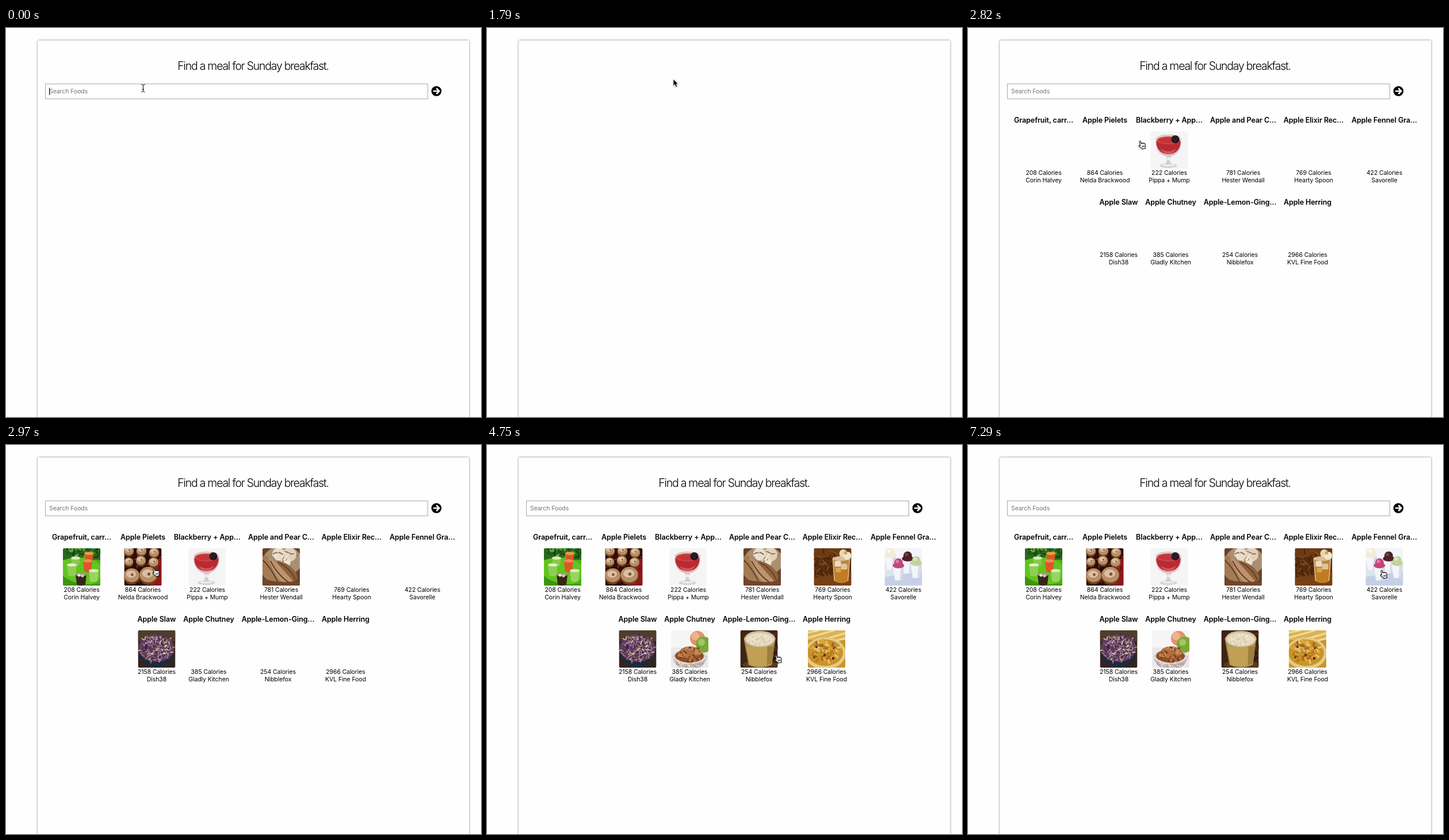
Write an HTML page that moves like this. It is 826x678 px and loops after 8000 ms.

```html
<!DOCTYPE html>
<html lang="en">
<head>
<meta charset="utf-8">
<title>Meal search</title>
<style>
  html, body { margin: 0; width: 100%; height: 100%; overflow: hidden; background: #fefefe; }
  svg { display: block; font-family: Inter, "Open Sans", sans-serif; }
  .sheet { fill: #fefefe; filter: drop-shadow(0 .6px 1.5px rgba(0, 0, 0, .56)); }
  .head { font-size: 19.5px; font-weight: 300; letter-spacing: -1.24px; }
  .small { font-size: 10.5px; letter-spacing: -.08px; }
  .name { font-size: 12.5px; font-weight: 600; letter-spacing: -.08px; }
  .mid { text-anchor: middle; }
</style>
</head>
<body>
<svg id="stage" width="826" height="678" viewBox="0 0 826 678">
  <defs><clipPath id="frame"><rect width="65" height="65" rx="2.5"/></clipPath></defs>
  <rect class="sheet" x="55" y="21.5" width="750.5" height="700" rx="2"/>
  <g id="form">
    <text class="head mid" x="429.5" y="73">Find a meal for Sunday breakfast.</text>
    <rect x="68.5" y="97.5" width="665" height="26" fill="#fff" stroke="#a9a9a9"/>
    <text id="field" class="small" x="75" y="114.3"></text>
    <path id="caret" d="M0 104V117" stroke="#000"/>
    <circle cx="748.5" cy="110" r="8.8"/>
    <path d="M743 110H753M748.4 105L753.4 110 748.4 115" fill="none" stroke="#fff" stroke-width="2.5"/>
  </g>
  <g id="results"></g>
  <g id="ibeam" fill="none" stroke="#000">
    <path d="M-3-6.5Q0-6.5 0-4.5Q0-6.5 3-6.5M0-4.5V4.5M-3 6.5Q0 6.5 0 4.5Q0 6.5 3 6.5M-1.5 2H1.5"/>
  </g>
  <g id="arrow">
    <path d="M0 0V12L2.7 9.4 4.6 14 6.8 13 4.9 8.7H8.6Z" stroke="#fff" stroke-width=".8"
      style="filter:drop-shadow(0 1px 1px rgba(0,0,0,.35))"/>
  </g>
  <g id="hand">
    <g transform="rotate(-14 6 8)" stroke="#000" stroke-linejoin="round">
      <path d="M3.4 8.6V1.8a1.2 1.2 0 0 1 2.4 0V5.6a1.1 1.1 0 0 1 2.2.3 1.1 1.1 0 0 1 2.1.5 1.1 1.1 0 0 1 2 .7V10.8L11 13.4V15.2H4.9V13.8L1.2 9.6C.2 8.2 1.8 7.2 2.6 8Z" fill="#fff"/>
      <path d="M6.2 9.5V12.6M8 9.5V12.6M9.8 9.5V12.6" stroke-width=".8"/>
    </g>
  </g>
</svg>
<script>
const $ = id => document.getElementById(id);
const LOOP = 8000, STEP = 148.7, LEAD = 10;

// shape helpers for the 65 x 65 food pictures
const box = (x, y, w, h, fill, r = 0) => `<rect x="${x}" y="${y}" width="${w}" height="${h}" rx="${r}" fill="${fill}"/>`;
const oval = (x, y, rx, ry, fill) => `<ellipse cx="${x}" cy="${y}" rx="${rx}" ry="${ry}" fill="${fill}"/>`;
const dot = (x, y, r, fill) => oval(x, y, r, r, fill);
const shape = (d, fill) => `<path d="${d}" fill="${fill}"/>`;
const line = (d, color, w = 1) => `<path d="${d}" fill="none" stroke="${color}" stroke-width="${w}"/>`;
const ground = fill => box(0, 0, 65, 65, fill);

function seeded(seed) {
  return () => (seed = seed * 16807 % 2147483647) / 2147483647;
}

// scatters short strips of the given colours inside an ellipse
function strips(seed, n, cx, cy, rx, ry, colors, len, w) {
  const rnd = seeded(seed);
  let out = '';
  for (let i = 0; i < n; i++) {
    const a = rnd() * 6.283, d = Math.sqrt(rnd()), b = rnd() * 6.283;
    const x = cx + rx * d * Math.cos(a), y = cy + ry * d * Math.sin(a);
    out += line(`M${x.toFixed(1)} ${y.toFixed(1)}l${(len * Math.cos(b)).toFixed(1)} ${(len * Math.sin(b)).toFixed(1)}`,
      colors[i % colors.length], w);
  }
  return out;
}

const glass = (x, y, w, h, fill, top) =>
  shape(`M${x} ${y}H${x + w}L${x + w - 2} ${y + h}Q${x + w / 2} ${y + h + 4} ${x + 2} ${y + h}Z`, fill) +
  oval(x + w / 2, y, w / 2, 2.8, top);
const muffin = (x, y, r) => dot(x, y + 2, r, '#6d3f1f') + oval(x, y, r * .95, r * .85, '#b98d66') +
  oval(x - 1, y - 2, r * .6, r * .45, '#d9c0a3') + dot(x + 1, y - 1, r * .17, '#7c5236');
const cup = (x, y, scoop, light) => shape(`M${x - 10} ${y + 4}H${x + 10}L${x + 6} ${y + 29}H${x - 6}Z`, '#f3f5fa') +
  shape(`M${x + 4} ${y + 6}H${x + 10}L${x + 6} ${y + 29}H${x + 2}Z`, '#d5dbea') +
  oval(x, y + 3, 10, 5, scoop) + dot(x, y - 2, 7.5, scoop) + dot(x - 2, y - 4, 3, light);

const pictures = {
  juice: () => ground('#4fae17') + box(0, 0, 65, 20, '#2b6a1b') + strips(5, 60, 38, 7, 33, 12, ['#123f10', '#1e5a16', '#7fb355'], 6, 2.2) +
    oval(27, 41, 43, 25, '#62c41f') + shape('M0 48Q20 66 65 62V65H0Z', '#3f9312') +
    glass(37, 9, 16, 14, '#d8581f', '#ee9a4a') + glass(14, 17, 16, 13, '#8dc653', '#dcefbd') +
    glass(35, 22, 16, 18, '#e05528', '#f08a56') + glass(7, 29, 17, 18, '#8fce55', '#e0f2cb') +
    glass(45, 39, 17, 18, '#98d462', '#dcedc0') + glass(22, 46, 19, 17, '#38241a', '#a8978a') +
    dot(28, 47, 2.5, '#ece6e0') + dot(34, 48, 2.5, '#d6cbc2'),
  pies: () => ground('#2b0d0a') + box(46, 18, 19, 47, '#8e171b') + strips(8, 45, 32, 32, 34, 34, ['#1a0705', '#9c1d20', '#4d1210'], 6, 2) +
    muffin(8, 4, 9) + muffin(30, 4, 9) + muffin(52, 7, 9) + muffin(8, 23, 8) + muffin(29, 21, 9) +
    muffin(51, 24, 9) + muffin(13, 47, 14) + muffin(42, 46, 16),
  cocktail: () => ground('#f6f4f4') + oval(31, 60, 15, 4, '#d6d2d4') + oval(31, 59, 11, 2, '#efedee') +
    shape('M27 43H36L33 50 36 58H26L29 50Z', '#d3cdd0') + dot(31.5, 48, 2.5, '#f2eff0') +
    shape('M9 13H53C55 34 43 44 31 44C19 44 7 34 9 13Z', '#dcc3c6') + shape('M10 17H52C53 31 43 40 31 40C19 40 9 31 10 17Z', '#b92a33') +
    shape('M17 30Q31 40 45 30Q40 40 31 40T17 30Z', '#d4565a') + oval(31, 14, 21.5, 8, '#e5c9c8') +
    oval(31, 16, 20, 7, '#cf4340') + oval(30, 16, 16, 4.5, '#c2333a') + line('M9.5 13A22 8 0 0 1 53 13', '#cfc3c6') +
    dot(43, 14, 7, '#25171f') + strips(3, 14, 43, 14, 5, 5, ['#574052', '#0d080d'], 1.5, 1.5),
  pears: () => ground('#674329') + oval(35, 22, 34, 26, '#a98f72') + dot(28, 10, 11, '#e6dccb') + dot(47, 11, 12, '#e0d2bd') + dot(40, 24, 9, '#ebe0cd') +
    line('M18 10Q28 4 35 11M42 6Q50 12 55 9', '#8f6b4e', 2) + strips(31, 18, 38, 13, 22, 12, ['#f5eee0', '#9a7757'], 5, 1.5) +
    shape('M0 14Q10 9 18 25Q32 44 34 62Q11 62 0 46Z', '#a57b54') +
    shape('M10 16Q23 22 42 44Q59 56 48 64Q25 63 10 16Z', '#bd9470') + shape('M23 23Q42 21 58 42Q65 55 54 58Q40 42 23 23Z', '#8f623c') +
    line('M1 21Q16 35 28 62M14 22Q27 48 48 61M28 25Q49 35 57 55', '#5e3b22', 1.8) + shape('M0 52Q22 62 65 57V65H0Z', '#70452a'),
  elixir: () => ground('#542a10') + box(0, 0, 65, 16, '#6b3a14') + strips(4, 40, 18, 28, 30, 30, ['#7a4316', '#3e1d0b', '#8d5120'], 9, 1.6) +
    shape('M0 51L65 42V65H0Z', '#784012') + shape('M32 18H63L60 57Q48 64 35 57Z', '#b98546') + shape('M33 36H62L60 55Q48 62 35 55Z', '#bf7d22') +
    oval(47, 18, 15, 4, '#dcbf94') + dot(51, 9, 7, '#e9d8b4') + dot(58, 13, 7, '#f2e5c9') + dot(55, 8, 3, '#c7a468') +
    box(36, 22, 11, 10, '#ecdcc0', 2) + box(47, 27, 11, 10, '#e2c493', 2) + box(38, 34, 9, 8, '#d5a55a', 2) +
    line('M33 19L36 57M62 19L59 57', '#e0c496', 1.2),
  sorbet: () => ground('#dde3f0') + box(0, 0, 65, 22, '#f3f5fb') + shape('M0 50L65 39V65H0Z', '#c6d0e5') +
    cup(10, 9, '#f3ead8', '#fffaf0') + cup(40, 15, '#4d2028', '#74404a') + cup(55, 23, '#c0d49c', '#dce9c2') + cup(24, 27, '#c2457c', '#e07ba6'),
  slaw: () => ground('#35241c') + box(0, 0, 65, 19, '#4f3c2c') + oval(32, 39, 31, 26, '#1e2a39') + oval(32, 31, 31, 24, '#5f3d5c') +
    strips(17, 180, 32, 31, 28, 22, ['#ddd2bd', '#5c315f', '#3d1e42', '#a3936a', '#a57b9e'], 6, 1.6),
  chutney: () => ground('#ece9eb') + box(0, 0, 65, 30, '#f6f5f6') + dot(46, 14, 13, '#e0946c') + dot(42, 10, 7, '#ebb48e') +
    dot(57, 25, 14, '#78a935') + dot(53, 21, 6, '#a3c662') + shape('M2 45H63Q58 65 43 67H22Q7 65 2 45Z', '#c4bab8') +
    oval(32, 46, 29, 12, '#d8cfcc') + oval(32, 45, 25, 12, '#8e4f28') + oval(33, 38, 18, 10, '#ad693a') +
    strips(9, 60, 33, 42, 21, 12, ['#c98f5c', '#7b3f1d', '#b97440'], 4, 3) + strips(15, 24, 32, 60, 26, 4, ['#efe9e8', '#9f8f8b'], 4, 1.5) +
    line('M3 47Q32 68 62 47', '#f2eded', 1.5),
  shake: () => ground('#3d2514') + strips(6, 28, 50, 32, 20, 33, ['#55361d', '#2a170b'], 12, 2) + oval(35, 60, 31, 7, '#5a3a1c') +
    shape('M6 13H61L55 60Q34 69 14 60Z', '#b29862') + shape('M9 28H58L53 58Q34 66 15 58Z', '#c1a055') +
    shape('M47 28H58L53 58L46 61Z', '#a07f3d') + oval(34, 15, 27, 14, '#cfc09c') + oval(34, 16, 24, 11.5, '#e6dbc0') +
    strips(12, 45, 34, 17, 20, 9, ['#cdb98f', '#f8f1e0'], 2, 1.5) + line('M7 18L15 59M60 18L53 59', '#8f7645', 1.4),
  herring: () => ground('#c9952a') + box(0, 0, 65, 17, '#dcb355') + line('M0 4L20 0M0 13L46 0M20 18L65 5M43 20L65 14', '#f0dc9c', 3) +
    oval(30, 40, 36, 28, '#e3c98c') + oval(30, 39, 31, 23, '#c99427') +
    strips(21, 60, 29, 37, 23, 17, ['#a8641a', '#d9a93c', '#bb7a20', '#e2c06c'], 8, 4) +
    dot(15, 29, 2, '#4a2a10') + dot(29, 43, 2, '#4a2a10') + dot(44, 49, 2.3, '#4a2a10') + dot(45, 31, 1.8, '#5b3310') + dot(11, 47, 1.8, '#4a2a10')
};

// centre x, row, title, calories, author, picture, step at which the picture loads
const meals = [
  [131.5, 0, 'Grapefruit, carr…', 208, 'Corin Halvey', 'juice', 20],
  [238, 0, 'Apple Pielets', 864, 'Nelda Brackwood', 'pies', 20],
  [350, 0, 'Blackberry + App…', 222, 'Pippa + Mump', 'cocktail', 18],
  [478.5, 0, 'Apple and Pear C…', 781, 'Hester Wendall', 'pears', 20],
  [601, 0, 'Apple Elixir Rec…', 769, 'Hearty Spoon', 'elixir', 21],
  [724, 0, 'Apple Fennel Gra…', 422, 'Savorelle', 'sorbet', 21],
  [262, 1, 'Apple Slaw', 2158, 'Dish38', 'slaw', 20],
  [352.5, 1, 'Apple Chutney', 385, 'Gladly Kitchen', 'chutney', 21],
  [473, 1, 'Apple-Lemon-Ging…', 254, 'Nibblefox', 'shake', 21],
  [590.5, 1, 'Apple Herring', 2966, 'KVL Fine Food', 'herring', 21]
];

$('results').innerHTML = meals.map(([x, row, title, kcal, author, pic]) => {
  const label = (cls, y, s) => `<text class="${cls} mid" y="${y}">${s}</text>`;
  return `<g transform="translate(${x} ${row * 143})">` + label('name', 165.4, title) +
    `<g id="${pic}" transform="translate(-32.5 180)"><g clip-path="url(#frame)">${pictures[pic]()}</g></g>` +
    label('small', 255.8, kcal + ' Calories') + label('small', 268.8, author) + '</g>';
}).join('');

// pointer stops: step, x, y
const stops = [
  [0, 238.5, 105], [7, 238.5, 105], [9, 640, 96], [10, 753, 111], [12, 324, 89], [13, 324, 89], [15, 312, 35],
  [19, 296, 196], [21, 212, 232], [25, 154.5, 219], [29, 357, 340], [32, 499.5, 365], [33, 499.5, 365],
  [40, 603.5, 265], [45, 603.5, 265], [49, 716, 217.5], [60, 716, 217.5]
];

function pointerAt(n) {
  const i = stops.findIndex((s, j) => n < stops[j + 1][0]);
  const [a, b, c] = stops.slice(i, i + 3);
  let k = (n - a[0]) / (b[0] - a[0]);
  if (c && c[1] === b[1] && c[2] === b[2]) k = 1 - (1 - k) ** 2;
  return [a[1] + (b[1] - a[1]) * k, a[2] + (b[2] - a[2]) * k];
}

const typed = n => n < 2 || n >= 12 ? '' : n < 4 ? 'a' : n < 5 ? 'ap' : n < 6 ? 'app' : 'apple';
const show = (id, on) => $(id).setAttribute('visibility', on ? 'inherit' : 'hidden');

function draw(t) {
  const n = Math.floor((t + LEAD) / STEP);
  const text = typed(n), field = $('field');
  const loaded = n >= 17;

  show('form', n < 12 || loaded);
  show('results', loaded);
  for (const meal of meals) show(meal[5], loaded && n >= meal[6]);

  field.textContent = text || 'Search Foods';
  field.setAttribute('fill', text ? '#000' : '#757575');
  const end = text ? field.getComputedTextLength() : 0;
  $('caret').setAttribute('transform', `translate(${Math.round(75 + end) + .5} 0)`);
  show('caret', n < 8 && n !== 1);

  const kind = n < 10 ? 'ibeam' : n < 12 || n >= 18 ? 'hand' : 'arrow';
  const [x, y] = pointerAt(n);
  for (const id of ['ibeam', 'arrow', 'hand']) show(id, id === kind);
  $(kind).setAttribute('transform', `translate(${x.toFixed(1)} ${y.toFixed(1)})`);
}

const start = performance.now();
function tick() {
  draw((performance.now() - start) % LOOP);
  requestAnimationFrame(tick);
}
tick();
</script>
</body>
</html>
```
